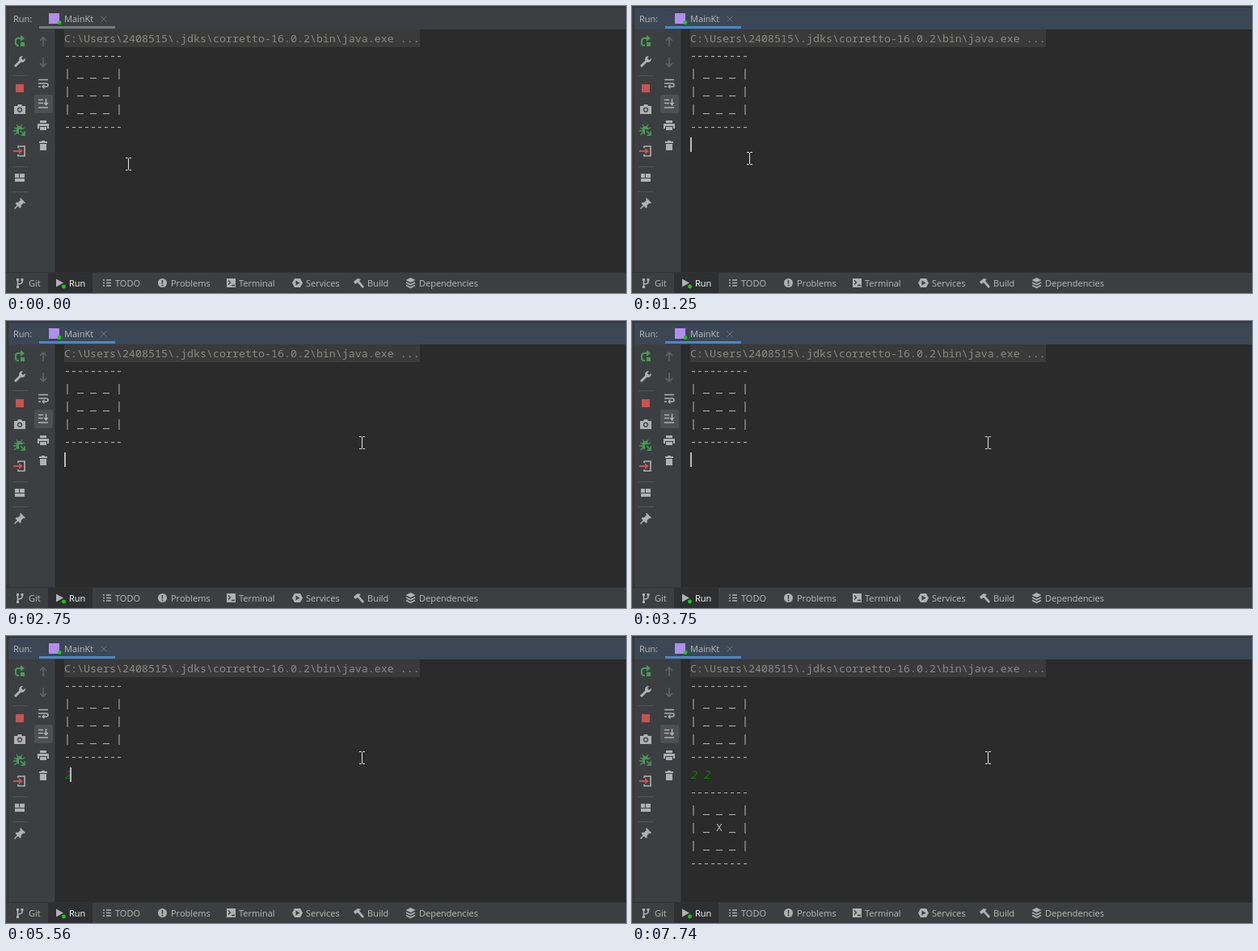
Recreate the animation shown at these times as an HTML page. Size 767 px wide and 356 px high, loop 8 s.

```html
<!DOCTYPE html>
<html lang="en">
<head>
<meta charset="utf-8">
<title>Run console</title>
<style>
html, body { margin: 0; width: 100%; height: 100%; overflow: hidden; background: #2b2b2b; }
svg { display: block; width: 767px; height: 356px; }
text { white-space: pre; }
.ui { font: 11px "Open Sans", "Noto Sans", sans-serif; fill: #bbb; }
.mono { font: 500 13.333px "Noto Sans Mono", "DejaVu Sans Mono", monospace; fill: #bbb; }
.input { font-style: italic; fill: #008500; }
.line { fill: none; stroke: #afb1b3; stroke-width: 1.6; }
.solid { fill: #afb1b3; }
.dim { stroke: #626567; }
.green { fill: #499c54; }
.red { fill: #c75450; }
.green.line, .red.line { fill: none; }
.green.line { stroke: #499c54; }
.red.line { stroke: #c75450; }
.live { fill: #0fd30f; }
.edge { fill: #323232; }
.split { fill: #515456; }

#header, #underline, #cursor, #caret, .reveal { animation: 8s step-end infinite; }
#header { animation-name: header; }
#underline { animation-name: underline; }
#cursor { animation-name: cursor; }
#caret { animation-name: caret, blink; }
#first { animation-name: first; }
#second { animation-name: second; }
#output { animation-name: output; }

@keyframes header { 0% { fill: #3c3f41; } 15.625%, 100% { fill: #3b4754; } }
@keyframes underline { 0% { fill: #747a80; } 15.625%, 100% { fill: #4a88c7; } }
@keyframes first { 0% { visibility: hidden; } 69.5%, 100% { visibility: visible; } }
@keyframes second { 0% { visibility: hidden; } 72.625%, 100% { visibility: visible; } }
@keyframes output { 0% { visibility: hidden; } 85.375%, 100% { visibility: visible; } }
@keyframes cursor {
  0% { transform: translate(148px, 188px); }
  6.25% { transform: translate(143px, 182px); }
  7.75% { transform: translate(142px, 181px); }
  17.125% { transform: translate(160px, 180px); }
  18.625% { transform: translate(232px, 175px); }
  20.125% { transform: translate(335px, 165px); }
  21.625% { transform: translate(411px, 153px); }
  23.125% { transform: translate(441px, 146px); }
  24.625%, 100% { transform: translate(437px, 143px); }
}
@keyframes caret {
  0% { transform: translate(72px, 163px); }
  69.5% { transform: translate(79px, 163px); }
  71.125% { transform: translate(87px, 163px); }
  72.625% { transform: translate(95px, 163px); }
  83.875% { transform: translate(72px, 185px); }
  86.875%, 100% { transform: translate(72px, 295px); }
}
@keyframes blink {
  0%, 28%, 40.625%, 53.625%, 66.375%, 96.75%, 100% { visibility: hidden; }
  14.125%, 34.375%, 46.875%, 59.875%, 69.5% { visibility: visible; }
}
</style>
</head>
<body>
<svg viewBox="0 0 767 356">
  <rect width="767" height="356" fill="#3c3f41"/>
  <rect x="61" y="29" width="706" height="302" fill="#2b2b2b"/>

  <!-- Header -->
  <rect class="edge" y="1" width="767" height="1"/>
  <rect id="header" x="3" y="2" width="764" height="27"/>
  <rect id="underline" x="41" y="25" width="94" height="3"/>
  <text class="ui" x="9" y="20">Run:</text>
  <rect x="53" y="9" width="13" height="13" fill="#b38cf0"/>
  <circle class="live" cx="66" cy="20.500" r="2.400"/>
  <text class="ui" x="72" y="20">MainKt</text>
  <path d="M117.500 12.500l7 7m0-7l-7 7" fill="none" stroke="#6e7376"/>

  <!-- Tool strips -->
  <rect class="edge" x="2" y="2" width="1" height="328"/>
  <rect class="edge" x="60" y="29" width="1" height="301"/>
  <rect class="split" x="8" y="86" width="19" height="1"/>
  <rect class="split" x="8" y="199" width="19" height="1"/>
  <rect class="split" x="8" y="230" width="19" height="1"/>
  <rect x="35" y="110" width="23" height="23" rx="2" fill="#4c5052"/>

  <g transform="translate(9 36)">
    <path class="green line" d="M11 4H6Q3 4 3 7V10Q3 13 6 13H7" style="stroke-width:2"/>
    <path class="green" d="M9 0l5 4-5 4zM9 9h5v5H9z"/>
  </g>
  <g transform="translate(9 61)">
    <path class="line" d="M2 14L9 7" style="stroke-width:3"/>
    <path class="solid" d="M7 6Q7 1 12 1L10 4 12 6 15 4Q15 9 10 9z"/>
  </g>
  <rect class="red" x="12" y="97" width="10" height="10"/>
  <g transform="translate(9 120)">
    <path class="solid" fill-rule="evenodd" d="M1 4H5L6 2H10L11 4H15V14H1zM8 5.500a3.200 3.200 0 1 0 .01 0z"/>
    <circle class="solid" cx="8" cy="8.700" r="1.800"/>
  </g>
  <g transform="translate(9 146)">
    <path class="green line" d="M4 1l2 3m5-3L9 4M1 5l4 2m9-2l-4 2M0 9h5M1 14l4-3" style="stroke-width:1.300"/>
    <path class="green" d="M4 6Q4 3 7.500 3T11 6V7H7V13Q4 13 4 10z"/>
    <path class="green line" d="M9 9l5 5m0-4.500V14.200H9.500"/>
  </g>
  <g transform="translate(9 172)">
    <path class="line" d="M6 4V2H14V14H6V12"/>
    <path class="red line" d="M0 8H9" style="stroke-width:2"/>
    <path class="red" d="M7 4l5 4-5 4z"/>
  </g>
  <path class="solid" d="M11 208h5v5h-5zM17 208h6v5h-6zM11 214h12v4h-12z"/>
  <g transform="translate(9 237)">
    <path class="solid" d="M9 1l6 6-1.500 1-1-.5-3 3 .3 2-1.300 1.500-6-6L4 6.500l2 .3 3-3L8 2.500z"/>
    <path class="line" d="M1.500 14.500L6 10"/>
  </g>

  <path class="line dim" d="M46 50V39m-4 4l4-4 4 4"/>
  <path class="line dim" d="M46 64V75m-4-4l4 4 4-4"/>
  <g transform="translate(38 88)">
    <path class="line" d="M2 3.500H14M2 8H12Q14 8 14 10T12 12H8M2 12H5"/>
    <path class="solid" d="M9.500 9v6L6 12z"/>
  </g>
  <g transform="translate(38 113)">
    <path class="line" d="M2 3.500H8M2 7.500H8M2 13H14M11.500 2V9"/>
    <path class="solid" d="M8.500 7h6l-3 4z"/>
  </g>
  <g transform="translate(38 140)">
    <path class="solid" d="M4 2H12V5H4zM1 6H15V12H13V9H3V12H1zM4 10H12V14H4z"/>
  </g>
  <g transform="translate(38 165)">
    <path class="solid" d="M3 3H6V2H10V3H13V5H3zM4 6H12V14H4z"/>
  </g>

  <!-- Console -->
  <rect x="72" y="29" width="440" height="22" fill="#3a3a3a"/>
  <text class="mono" x="72" y="45" style="fill:#8c8a85">C:\Users\2408515\.jdks\corretto-16.0.2\bin\java.exe ...</text>
  <g id="start"></g>
  <text class="mono input reveal" id="first" x="72" y="177">2</text>
  <text class="mono input reveal" id="second" x="88" y="177">2</text>
  <g id="output" class="reveal"></g>
  <rect id="caret" width="2" height="18" fill="#bbb"/>
  <path id="cursor" d="M0 .5H2.500L3.500 1.500 4.500 .5H7M3.500 1V15M0 15.500H2.500L3.500 14.500 4.500 15.500H7" fill="none" stroke="#e4e4e4"/>

  <!-- Bottom bar -->
  <rect class="edge" y="330" width="767" height="1"/>
  <rect x="52" y="331" width="55" height="25" fill="#2d2f30"/>
  <g transform="translate(9 336)">
    <path class="line" d="M5.500 3V13M11 4V6Q11 9 5.500 9"/>
    <path class="solid" d="M4 2h3v3H4zM9.500 2h3v3h-3zM4 11h3v3H4z"/>
  </g>
  <path class="solid" d="M62 338.500l9 5-9 5z"/>
  <circle class="live" cx="71.500" cy="348" r="2.400"/>
  <path class="line" d="M120 340h2m2 0h6M120 343.500h2m2 0h6M120 347h2m2 0h6"/>
  <circle class="solid" cx="193.500" cy="343.500" r="5.500"/>
  <path d="M193.500 340v4.500m0 1v2" fill="none" stroke="#3c3f41" stroke-width="1.600"/>
  <rect class="solid" x="273" y="338" width="11" height="11"/>
  <path d="M275 340.500l2.500 2.500-2.500 2.500M279 346.500h4" fill="none" stroke="#3c3f41" stroke-width="1.300"/>
  <path class="solid" fill-rule="evenodd" d="M357 338h7l3 5.500-3 5.500h-7l-3-5.500zM358.500 340.500v6l5-3z"/>
  <path class="solid" d="M430 342l5-4 4 1-2 2 6 7-2 2-6-7-3 2z"/>
  <path class="solid" d="M500.500 337l6 3-6 3-6-3z"/>
  <path class="line" d="M495 343l5.500 2.800 5.500-2.800M495 346.500l5.500 2.800 5.500-2.800"/>
  <g class="ui">
    <text x="28" y="348">Git</text>
    <text x="78" y="348" style="fill:#fff">Run</text>
    <text x="135" y="348">TODO</text>
    <text x="204" y="348">Problems</text>
    <text x="288" y="348">Terminal</text>
    <text x="371" y="348">Services</text>
    <text x="447" y="348">Build</text>
    <text x="511" y="348">Dependencies</text>
  </g>
</svg>
<script>
const LINE = 22;
const RULE = '---------';

function drawBoard(id, baseline, cells) {
  const rows = cells.map(row => `| ${[...row].join(' ')} |`);
  document.getElementById(id).innerHTML = [RULE, ...rows, RULE]
    .map((row, i) => `<text class="mono" x="72" y="${baseline + i * LINE}">${row}</text>`)
    .join('');
}

drawBoard('start', 66, ['___', '___', '___']);
drawBoard('output', 198, ['___', '_X_', '___']);
</script>
</body>
</html>
```
